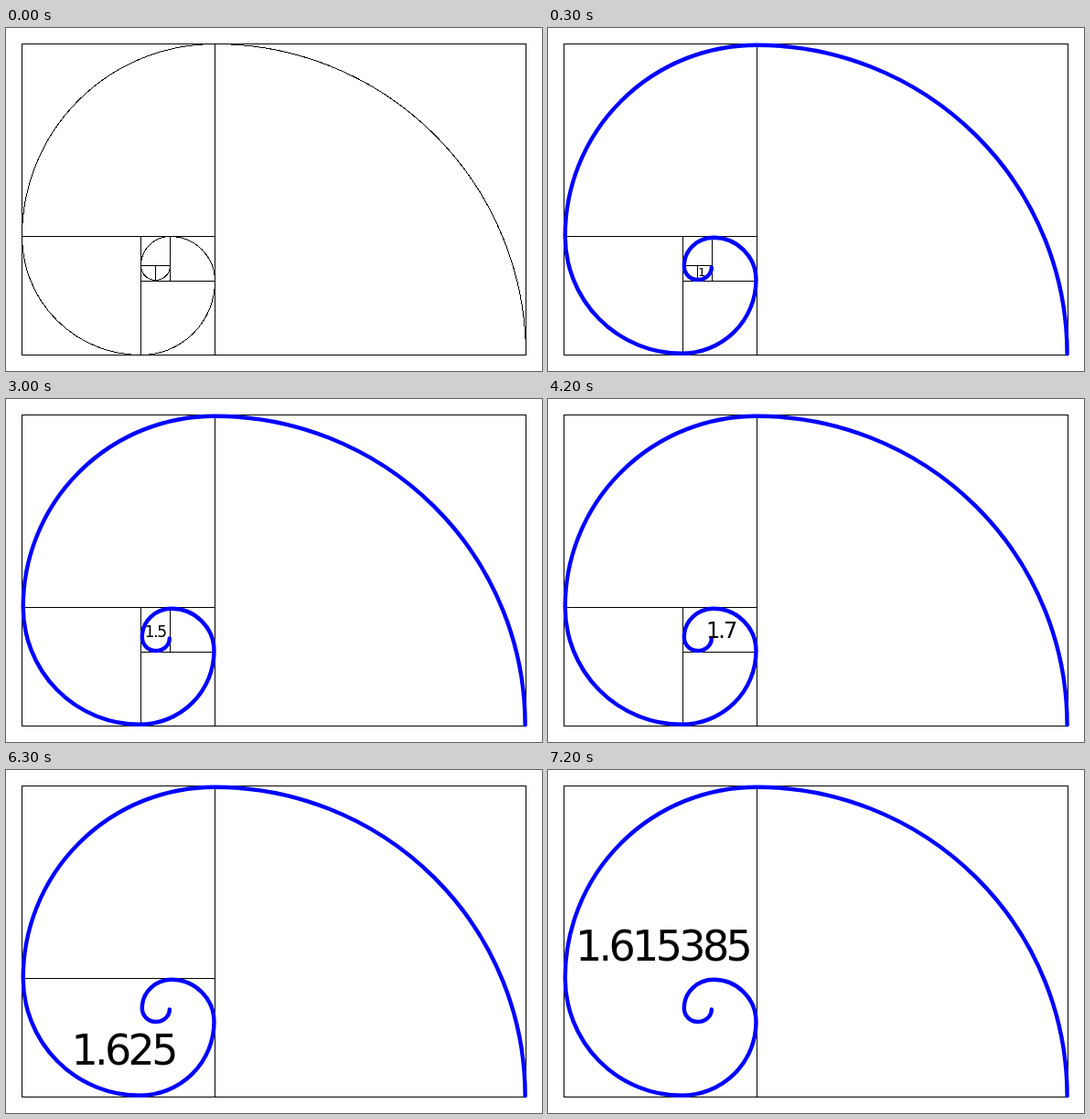
Recreate the animation shown at these times as an HTML page. Size 586 by 376 pixels, loop 8 s.

```html
<!DOCTYPE html>
<html lang="en">
<head>
<meta charset="utf-8">
<title>Fibonacci ratios</title>
<style>
  html, body { margin: 0; width: 100%; height: 100%; overflow: hidden; background: #fff; }
  svg { display: block; width: 586px; height: 376px; }
  .thin { fill: none; stroke: #000; stroke-width: 1; shape-rendering: crispEdges; }
  .bold { fill: none; stroke: #00f; stroke-width: 4.4; stroke-linecap: round; }
  text { font-family: "DejaVu Sans", sans-serif; letter-spacing: -.08em; fill: #000; }
</style>
</head>
<body>
<svg id="stage" viewBox="0 0 586 376">
  <rect class="thin" x="17.5" y="17.5" width="551" height="341"/>
  <path class="thin" d="M228.5 17V359"/>
</svg>
<script>
const LOOP = 8000;
const SPIRAL_AT = 300;
const stage = document.getElementById('stage');

function add(tag, attrs) {
  const el = document.createElementNS('http://www.w3.org/2000/svg', tag);
  for (const key in attrs) el.setAttribute(key, attrs[key]);
  return stage.appendChild(el);
}

// Quarter ellipses joining the points, alternately leaving vertically and horizontally
function spiral(points) {
  return points.map(([x, y], i) => {
    if (!i) return `M${x} ${y}`;
    const [px, py] = points[i - 1];
    return `A${Math.abs(x - px)} ${Math.abs(y - py)} 0 0 1 ${x} ${y}`;
  }).join('');
}

const parts = [];
const show = (el, from, to) => parts.push({ el, from, to });

// Dividing lines and the time each one disappears
[
  ['M163.5 260V278', 1700],
  ['M147 260.5H180', 3000],
  ['M179.5 228V278', 4200],
  ['M147 277.5H229', 5300],
  ['M147.5 228V359', 6300],
  ['M17 228.5H229', 7200]
].forEach(([d, end]) => show(add('path', { class: 'thin', d }), 0, end));

const thin = spiral([
  [179.5, 260.5], [163.5, 276.5], [147.5, 260.5], [179.5, 228.5], [228.5, 277.5],
  [147.5, 358.5], [17.5, 228.5], [228.5, 17.5], [568.5, 358.5]
]);
const bold = spiral([
  [178.8, 262.5], [163.5, 276], [148.8, 261], [181, 229.8], [227.5, 276],
  [146, 356.8], [18.7, 228], [228, 18.7], [567.6, 357.3]
]);
show(add('path', { class: 'thin', d: thin }), 0, SPIRAL_AT);
show(add('path', { class: 'bold', d: bold }), SPIRAL_AT, LOOP);

// Ratio, x, baseline, size, start
const ratios = [
  ['1', 164, 272, 13, 300],
  ['2', 155, 273, 15, 1700],
  ['1.5', 151.7, 261, 17, 3000],
  ['1.7', 173, 261.5, 24, 4200],
  ['1.6', 165.5, 307.5, 30, 5300],
  ['1.625', 71.5, 322.5, 46, 6300],
  ['1.615385', 30, 208.5, 46, 7200]
];
ratios.forEach(([value, x, y, size, start], i) => {
  const el = add('text', { x, y, 'font-size': size });
  el.textContent = value;
  show(el, start, i + 1 < ratios.length ? ratios[i + 1][4] : LOOP);
});

function draw(t) {
  for (const { el, from, to } of parts) {
    el.style.display = t >= from && t < to ? '' : 'none';
  }
}

const begin = performance.now();
function tick() {
  draw((performance.now() - begin) % LOOP);
  requestAnimationFrame(tick);
}
tick();
</script>
</body>
</html>
```
